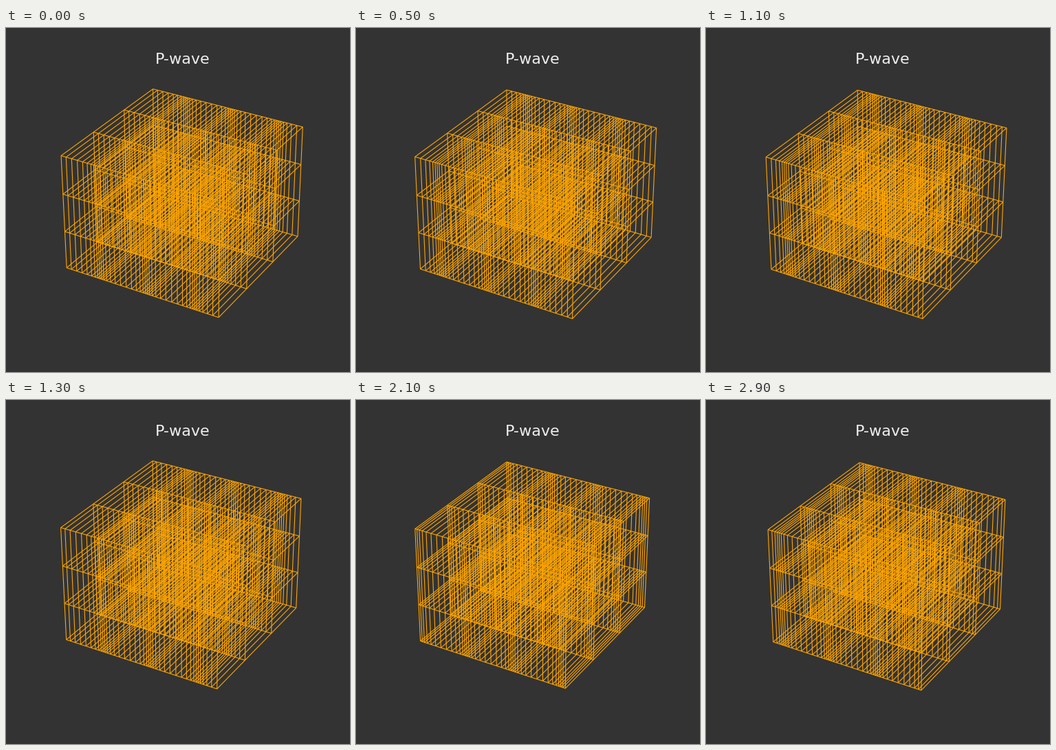
A matplotlib script that plays this animation: 500 px wide and 500 px high, repeating every 3000 ms.

```python
import numpy as np
import matplotlib.pyplot as plt
from matplotlib.animation import FuncAnimation
from mpl_toolkits.mplot3d.art3d import Line3DCollection

FRAMES = 30
INTERVAL = 100
AMPLITUDE = 0.5
X0, X1 = -20, 0
BACKGROUND = "#333333"

rest = np.linspace(X0, X1, 40)
levels = np.linspace(0, 1, 4)


def lattice(x):
    """Straight rods of the block: along x, along y and along z."""
    rods = [((x[0], a, b), (x[-1], a, b)) for a in levels for b in levels]
    for xi in x:
        for a in levels:
            rods.append(((xi, 0, a), (xi, 1, a)))
            rods.append(((xi, a, 0), (xi, a, 1)))
    return np.array(rods)


def wave(t):
    return rest + AMPLITUDE * np.sin(rest - t)


fig = plt.figure(figsize=(5, 5), dpi=100, facecolor=BACKGROUND)
ax = fig.add_subplot(projection="3d", facecolor=BACKGROUND)
ax.set_axis_off()
ax.view_init(elev=30, azim=-60)

block = Line3DCollection(lattice(wave(0)), colors="orange", linewidths=0.8)
ax.add_collection3d(block)
ax.set_xlim(X0, X1)
ax.set_ylim(0, 1)
ax.set_zlim(0, 1)

fig.text(0.5125, 0.8967, "P-wave", fontsize=16, color="#eeeeee",
         ha="center", va="baseline")


def update(i):
    block.set_segments(lattice(wave(i)))
    return [block]


anim = FuncAnimation(fig, update, frames=FRAMES, interval=INTERVAL,
                     repeat=True, repeat_delay=0, blit=False)
plt.show()
```
